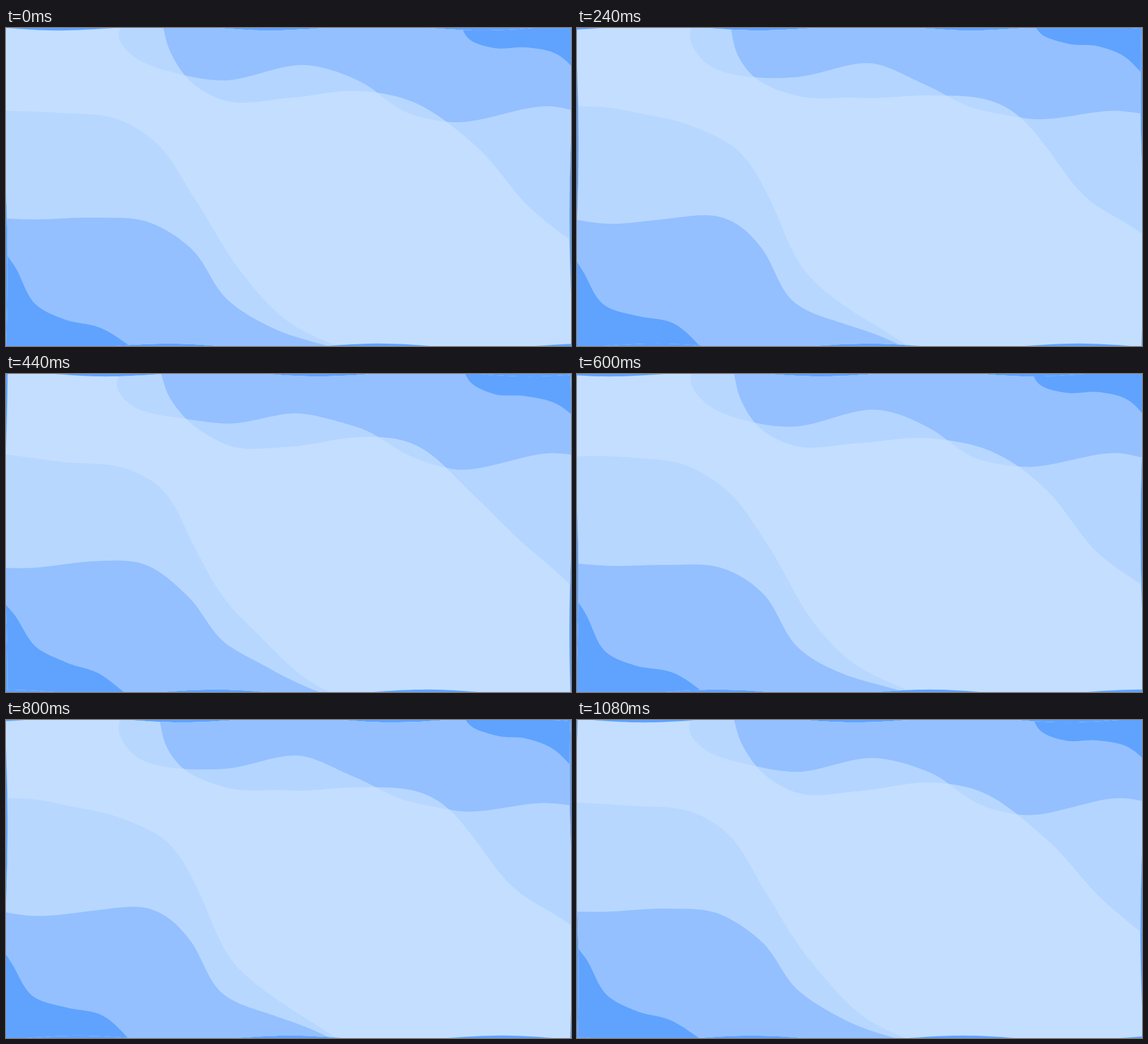
Write an HTML page with a canvas that moves like this. It is 960 by 540 pixels and loops after 1.12 s.

```html
<!DOCTYPE html>
<html lang="en">
<head>
<meta charset="utf-8">
<title>Blue waves</title>
<style>
  html, body { margin: 0; width: 100%; height: 100%; overflow: hidden; background: #5fa3ff; }
  canvas { display: block; }
</style>
</head>
<body>
<canvas id="stage" width="960" height="540"></canvas>
<script>
const W = 960, H = 540, LOOP = 1120, TICK = 40;
const ctx = document.getElementById('stage').getContext('2d');

const BLUE = '#5fa3ff', MID = '#94c0ff', LIGHT = '#c4deff';
const SKY = '#b4d5ff', HAZE = '#b7d7ff';

// One diagonal wave shakes the whole picture along its own crests.
const WAVE_X = 359, WAVE_Y = 540, CYCLE = 15.5, SIZE = 5;
const slant = Math.atan2(WAVE_X, WAVE_Y);
const push = [-SIZE * Math.sin(slant), SIZE * Math.cos(slant)];

const wave = ([x, y], step) =>
  Math.cos(2 * Math.PI * (x / WAVE_X + y / WAVE_Y + (step - 4) / CYCLE));

const shift = (p, amount) => [p[0] + push[0] * amount, p[1] + push[1] * amount];

const mix = (a, b, t) => a.map((v, i) => v + (b[i] - v) * t);

// Smooth curve through key points, with knots spaced by distance.
function smooth(keys, parts = 16) {
  const last = keys.length - 1;
  const pts = [mix(keys[1], keys[0], 2), ...keys, mix(keys[last - 1], keys[last], 2)];
  const knots = [0];
  for (let i = 1; i < pts.length; i++) {
    const [dx, dy] = [pts[i][0] - pts[i - 1][0], pts[i][1] - pts[i - 1][1]];
    knots.push(knots[i - 1] + Math.hypot(dx, dy) ** 0.75);
  }
  const out = [];
  for (let i = 1; i <= last; i++) {
    for (let j = 0; j < parts; j++) {
      const t = knots[i] + (knots[i + 1] - knots[i]) * j / parts;
      const join = (a, b, from, to) => mix(a, b, (t - knots[from]) / (knots[to] - knots[from]));
      const a = join(pts[i - 1], pts[i], i - 1, i);
      const b = join(pts[i], pts[i + 1], i, i + 1);
      const c = join(pts[i + 1], pts[i + 2], i + 1, i + 2);
      out.push(join(join(a, b, i - 1, i + 1), join(b, c, i, i + 2), i, i + 1));
    }
  }
  return [...out, keys[last]];
}

// Key points are given as posed at step 0; the result is the rest position.
const area = (corner, ...keys) =>
  [...smooth(keys), corner].map(p => shift(p, -wave(p, 0)));

const TOP_RIGHT = [W + 30, -30], LOW_LEFT = [-30, H + 30];

const ridge = area(TOP_RIGHT, [264, -14], [279, 40], [315, 92], [375, 124], [480, 119],
  [600, 107], [690, 125], [800, 202], [890, 305], [985, 380]);
const veil = area(TOP_RIGHT, [198, -14], [192, 16], [215, 47], [303, 80], [370, 89],
  [510, 63], [600, 90], [680, 143], [760, 160], [925, 133], [985, 145]);
const topCorner = area(TOP_RIGHT, [769, -12], [786, 18], [830, 34], [885, 33],
  [935, 44], [980, 84]);

const slope = area(LOW_LEFT, [-20, 140], [90, 144], [190, 155], [255, 195], [322, 292],
  [400, 415], [480, 499], [590, 552]);
const hill = area(LOW_LEFT, [-20, 323], [50, 325], [150, 322], [240, 329], [315, 375],
  [375, 460], [450, 508], [590, 552]);
const lowCorner = area(LOW_LEFT, [-10, 371], [15, 405], [50, 469], [100, 495],
  [160, 509], [228, 552]);

// Stage outline, cut into short pieces so that it can bend.
const corners = [[0, 0], [W, 0], [W, H], [0, H]];
const border = corners.flatMap((p, i) =>
  Array.from({ length: 100 }, (_, j) => mix(p, corners[(i + 1) % 4], j / 100)));

function trace(pts, step) {
  ctx.beginPath();
  for (const p of pts) ctx.lineTo(...shift(p, wave(p, step)));
  ctx.closePath();
}

function paint(pts, step, color) {
  trace(pts, step);
  ctx.fillStyle = color;
  ctx.fill();
}

function inside(pts, step, render) {
  ctx.save();
  trace(pts, step);
  ctx.clip();
  render();
  ctx.restore();
}

function draw(step) {
  ctx.fillStyle = BLUE;
  ctx.fillRect(0, 0, W, H);
  inside(border, step, () => {
    ctx.fillStyle = LIGHT;
    ctx.fillRect(0, 0, W, H);
    paint(veil, step, HAZE);
    paint(ridge, step, SKY);
    inside(ridge, step, () => paint(veil, step, MID));
    paint(topCorner, step, BLUE);
    paint(slope, step, HAZE);
    paint(hill, step, MID);
    paint(lowCorner, step, BLUE);
  });
}

// The wave takes a double step on every eighth tick.
function stepAt(ms) {
  const tick = Math.floor((ms % LOOP) / TICK);
  return tick + Math.floor((tick + 1) / 8);
}

function frame(now) {
  draw(stepAt(now));
  requestAnimationFrame(frame);
}

draw(0);
requestAnimationFrame(frame);
</script>
</body>
</html>
```
